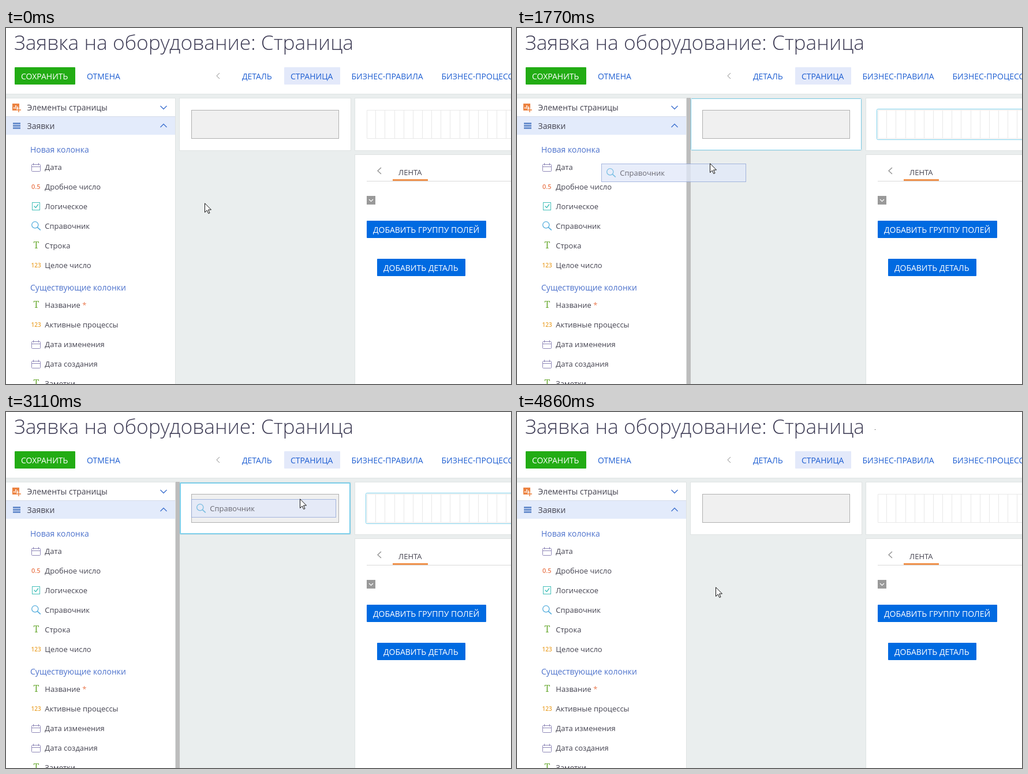
An HTML page that plays this animation: 875x617 px, repeating every 4.92 s.

```html
<!DOCTYPE html>
<html lang="ru">
<head>
<meta charset="utf-8">
<title>Заявка на оборудование</title>
<style>
html, body { margin: 0; width: 100%; height: 100%; overflow: hidden; background: #fff; }
svg { display: block; width: 875px; height: 617px; }
text { font-family: "Open Sans", sans-serif; white-space: pre; }
</style>
</head>
<body>
<svg id="stage" viewBox="0 0 875 617" xmlns="http://www.w3.org/2000/svg"></svg>
<script>
const INK = '#444350', LINK = '#1f5fd2', HEAD = '#4d72cc', GREEN = '#22ac14',
  BLUE = '#006ae1', SKY = '#7dcfea', GREY = '#8f8f8f', RED = '#f04a24';

const rect = (x, y, w, h, fill, more = '') =>
  `<rect x="${x}" y="${y}" width="${w}" height="${h}" fill="${fill}" ${more}/>`;
const box = (x, y, w, h, stroke, fill = 'none', more = '') =>
  rect(x + .5, y + .5, w - 1, h - 1, fill, `stroke="${stroke}" ${more}`);
const line = (d, stroke, width = 1, more = '') =>
  `<path d="${d}" fill="none" stroke="${stroke}" stroke-width="${width}" ${more}/>`;
const text = (x, y, s, size = 13, fill = INK, more = '') =>
  `<text x="${x}" y="${y}" font-size="${size}" fill="${fill}" ${more}>${s}</text>`;
const star = (fill = RED) => `<tspan fill="${fill}">*</tspan>`;
const button = (x, y, w, fill, s) =>
  rect(x, y, w, 30, fill, 'rx="1"') + text(x + 11, y + 21, s, 14, '#fff');
const group = (id, body, more = '') => `<g id="${id}" ${more}>${body}</g>`;

// Field icons; x and y are the row's left edge and text baseline
const icons = {
  date: (x, y) => box(x, y - 10, 16, 13, '#8f88b8', 'none', 'rx="1"') +
    line(`M${x} ${y - 5.5}h16M${x + 3.5} ${y - 12}v4M${x + 12.5} ${y - 12}v4`, '#8f88b8'),
  real: (x, y) => text(x, y - 1, '0.5', 11, '#ea7a50', 'font-weight="600"'),
  bool: (x, y) => box(x + 1, y - 12, 14, 14, '#45c0ba') +
    line(`M${x + 4.5} ${y - 5.5}l3 3 4.5-6`, '#45c0ba', 1.4),
  lookup: (x, y) => `<circle cx="${x + 6.3}" cy="${y - 6.7}" r="5.6" fill="none" stroke="#56aedd" stroke-width="1.3"/>` +
    line(`M${x + 10.3} ${y - 2.7}l5.5 5`, '#56aedd', 1.6),
  string: (x, y) => text(x + 3.5, y, 'T', 16, '#6cab36', 'style="font-family:\'Noto Serif\',serif"'),
  int: (x, y) => text(x - .5, y - 1, '123', 10, '#eba534', 'font-weight="600"')
};
const field = (icon, y, s) => icons[icon](44, y) + text(67.3, y, s);

const fields = [
  ['date', 246, 'Дата'], ['real', 280, 'Дробное число'], ['bool', 314, 'Логическое'],
  ['lookup', 348, 'Справочник'], ['string', 382, 'Строка'], ['int', 416, 'Целое число'],
  ['string', 485, 'Название ' + star('#ea7a50')], ['int', 519, 'Активные процессы'],
  ['date', 553, 'Дата изменения'], ['date', 587, 'Дата создания'], ['string', 621, 'Заметки']
];

function header() {
  return rect(0, 0, 875, 114, '#fff') + line('M0 114.5H875', '#dfe3e3') +
    text(14, 38, 'Заявка на оборудование: Страница', 35.4, '#3f3d56', 'font-weight="300"') +
    button(15, 68, 105, GREEN, 'СОХРАНИТЬ') + text(140, 89, 'ОТМЕНА', 14, LINK) +
    line('M370 78l-5 5 5 5', '#8a8a8a') + rect(482, 68, 97, 30, '#e3e9fa', 'rx="1"') +
    [[409, 'ДЕТАЛЬ'], [493, 'СТРАНИЦА'], [598.5, 'БИЗНЕС-ПРАВИЛА'], [754.5, 'БИЗНЕС-ПРОЦЕССЫ']]
      .map(([x, s]) => text(x, 89, s, 14, LINK)).join('');
}

function sidebar() {
  return rect(0, 122, 293, 495, '#fff') + line('M0 121.5H293.5V617', '#dfe3e3') +
    line('M0 153.5H293', '#d5dcea') + rect(0, 154, 293, 31, '#e3ebfb') +
    rect(11, 131, 12, 12, '#ec8240') + line('M14 140v-3M17 140v-6M20 140v-4', '#fff', 1.5) +
    line('M22 138v8M18 142h8', '#fff', 4) + line('M22 138v8M18 142h8', '#ec8240', 1.5) +
    [164, 168, 172].map(y => rect(12, y, 13, 3, '#6a8fcd')).join('') +
    text(36.5, 143, 'Элементы страницы', 14) + text(36.5, 175, 'Заявки', 14) +
    line('M267.5 135l5.5 5.5 5.5-5.5M267.5 172l5.5-5.5 5.5 5.5', '#3f72d0', 1.4) +
    text(42, 216, 'Новая колонка', 14, HEAD) + text(42, 455, 'Существующие колонки', 14, HEAD) +
    fields.map(f => field(...f)).join('');
}

function canvas() {
  let cols = 'M875 142.5H625.5V191.5H875';
  for (let i = 1; i < 16; i++) cols += `M${Math.floor(624.7 + i * 16.13) + .5} 142V192`;
  return box(300, 121, 298, 92, '#dfe3e3', '#fff') + box(321, 142, 256, 50, '#b0b0b0', '#f0f0f0') +
    box(604, 121, 300, 92, '#dfe3e3', '#fff') + line(cols, '#e8e8e8') +
    box(604, 219, 300, 420, '#dfe3e3', '#fff') + line('M650 242l-6 5.5 6 5.5', '#8a8a8a', 1.2) +
    text(680, 255, 'ЛЕНТА') + line('M625 265.5H875', '#d9d9d9') + rect(670, 262, 61, 3, '#f0924c') +
    rect(625, 291, 15, 15, '#999') + line('M629 297l3.5 3.5 3.5-3.5', '#fff', 1.2) +
    button(625, 334, 207, BLUE, 'ДОБАВИТЬ ГРУППУ ПОЛЕЙ') + button(643, 400, 153, BLUE, 'ДОБАВИТЬ ДЕТАЛЬ');
}

function dialog() {
  const dots = (x, y, end) => line(`M${x} ${y}H${end}`, '#b5b5b5', 1, 'stroke-dasharray="1 1"');
  const label = (x, y, s) => text(x, y, s, 12, GREY);
  const section = (y, s) => rect(215, y, 15, 15, '#ff4012') +
    line(`M219 ${y + 9}l3.5-3.5 3.5 3.5`, '#fff', 1.3) + text(243, y + 14, s, 14, HEAD);
  const radio = (y, s, on) =>
    `<circle cx="259" cy="${y}" r="7.2" fill="#fff" stroke="${on ? '#0b6be0' : '#858585'}" stroke-width="1.7"/>` +
    (on ? `<circle cx="259" cy="${y}" r="4.3" fill="#0b6be0"/>` : '') + text(284, y + 6, s);
  return rect(0, 0, 875, 617, 'rgba(100,104,135,.25)') +
    rect(183, 20, 550, 590, '#fff', 'style="filter:drop-shadow(0 1px 3px rgba(0,0,0,.3))"') +
    rect(183, 20, 550, 3, '#5cb6de') +
    text(210.5, 62, 'Новая колонка', 19.7, '#5cb6e0', 'font-weight="300"') +
    button(212, 93, 105, GREEN, 'СОХРАНИТЬ') + text(337.5, 114, 'ОТМЕНА', 14, LINK) +
    label(214, 162, 'Заголовок в БД' + star()) + text(374.3, 163, 'Справочник 1') + dots(374, 171.5, 689) +
    label(214, 195, 'Название в БД*') + text(374, 196, 'UsrLookup1') + dots(374, 204.5, 689) +
    '<path d="M215 215h7l-7 7z" fill="#8cc63f"/>' +
    label(220, 229, 'Заголовок на странице') + dots(374, 237.5, 689) +
    section(248, 'Справочник') +
    radio(298, 'Выбрать существующий справочник', true) + radio(330, 'Создать новый справочник') +
    label(217, 368, 'Справочник' + star()) + dots(376, 377.5, 687) +
    '<path d="M665 362h11l-5.5 5.5z" fill="#555"/>' +
    label(217, 397, 'Отображение справочника:') +
    radio(430, 'Всплывающее окно', true) + radio(462, 'Список') +
    section(488, 'Расширенные настройки') +
    label(217, 537, 'Обязательное для') + label(217, 555, 'заполнения в БД') +
    rect(377.8, 529.8, 14.4, 14.4, '#fff', 'rx="1" stroke="#858585" stroke-width="1.6"') +
    rect(696, 134, 7, 327, '#c9c9c9');
}

function moveCursor() {
  const arm = [[-1.5, -1.5], [-1.5, -7], [-4, -7], [0, -11], [4, -7], [1.5, -7]];
  const pts = [];
  for (let i = 0, c = 1, s = 0; i < 4; i++, [c, s] = [-s, c])
    arm.forEach(([x, y]) => pts.push([x * c - y * s, x * s + y * c]));
  return `<polygon points="${pts.join(' ')}" fill="#fff" stroke="#111"/>`;
}

const stage = document.getElementById('stage');
stage.innerHTML =
  rect(0, 0, 875, 617, '#eaeeee') + header() + sidebar() + canvas() +
  group('scroll', rect(294, 121, 7, 496, '#bdbdbd')) +
  group('hover', box(35, 327, 253, 32, '#96a5d6')) +
  group('target', box(301, 122, 296, 90, SKY, 'none', 'rx="1"') + box(623, 140, 300, 54, SKY, 'none', 'rx="2"')) +
  group('active', rect(302, 123, 294, 88, 'none', `rx="1" stroke="${SKY}" stroke-width="2"`)) +
  group('ghost', rect(0, 0, 251, 32, '#e2e9f9') + group('edge', box(0, 0, 251, 32, '#8fa5d8')) +
    icons.lookup(9, 21) + text(32.3, 21, 'Справочник'), 'opacity=".78"') +
  group('arrow', '<path d="M.5 .8V16.5L4.2 13 6.8 18.5 9 17.5 6.5 12H11.5Z" fill="#fff" stroke="#111"/>') +
  group('move', moveCursor(), 'transform="translate(220.5 328.5)"') +
  group('dialog', dialog()) + group('dot', rect(620, 30, 1, 1, '#222'));

const parts = {};
stage.querySelectorAll('g[id]').forEach(g => parts[g.id] = g);

const LOOP = 4920;
const spans = {
  scroll: [580, 3710], hover: [660, 1190], target: [1040, 3710], active: [2000, 3710],
  ghost: [1040, 3710], edge: [1190, 3710], move: [830, 1190], dialog: [3790, 4860], dot: [3790, LOOP]
};

// Runs of evenly spaced pointer steps: first time, last time, count
const runs = [[500, 660, 3], [1190, 1710, 8], [1770, 2290, 8], [2370, 2890, 8], [2970, 3190, 4]];
const ticks = runs.flatMap(([a, b, n]) =>
  Array.from({ length: n }, (_, i) => Math.ceil((a + i * (b - a) / (n - 1)) / 10) * 10));

// Pointer tip: step, x, y
const track = [[0, 344, 303], [3, 222, 328], [11, 316, 248], [12, 334, 234],
  [19, 427, 181], [24, 469, 158], [27, 490, 151], [31, 520, 150]];

// Tangent at a track point: the pointer sets off slowly and comes to rest
function slope(i, k) {
  if (i === 1) return k === 1 ? 5 : -4;
  if (i === track.length - 1) return 0;
  const a = track[i - 1], b = track[i + 1];
  return (b[k] - a[k]) / (b[0] - a[0]);
}

function pointer(step) {
  const i = Math.max(0, track.findIndex(p => p[0] >= step) - 1);
  const a = track[i], b = track[i + 1], h = b[0] - a[0], u = (step - a[0]) / h;
  return [1, 2].map(k => {
    const d = b[k] - a[k];
    if (i === 0) return Math.round(a[k] + d * u);
    const m = slope(i, k) * h, n = slope(i + 1, k) * h;
    return Math.round(a[k] + u * (m + u * (3 * d - 2 * m - n + u * (m + n - 2 * d))));
  });
}

const place = (el, x, y) => el.setAttribute('transform', `translate(${x} ${y})`);

function draw(now) {
  const t = now % LOOP;
  const within = ([a, b]) => t >= a && t < b;
  for (const id in spans) parts[id].style.display = within(spans[id]) ? '' : 'none';
  parts.arrow.style.display = within(spans.move) || within(spans.dialog) ? 'none' : '';
  const step = t < 4860 ? ticks.filter(v => v <= t).length : 0;
  const [x, y] = pointer(step);
  place(parts.arrow, x, y);
  if (t < 1190) place(parts.ghost, 222, 329);
  else place(parts.ghost, x - 188, y + 1);
}

const start = performance.now();
function loop() {
  draw(performance.now() - start);
  requestAnimationFrame(loop);
}
loop();
</script>
</body>
</html>
```
